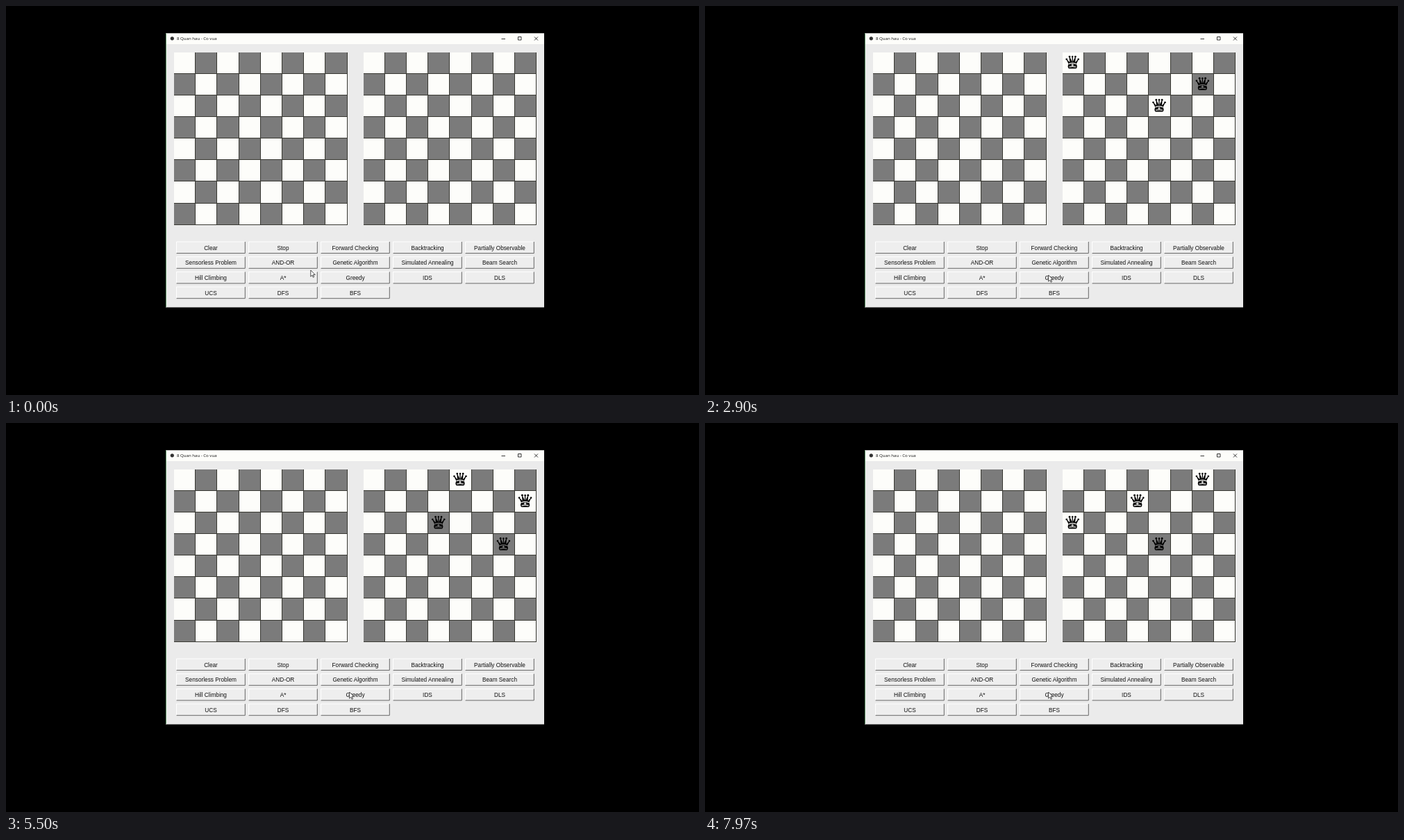
An HTML page that plays this animation: 998 by 561 pixels, repeating every 8000 ms.

```html
<!DOCTYPE html>
<html lang="vi">
<head>
<meta charset="utf-8">
<title>8 Quan hau</title>
<style>
  html, body { margin: 0; width: 100%; height: 100%; overflow: hidden; background: #000; }
  svg { display: block; width: 998px; height: 561px; }
  .label { font: 8.25px "Liberation Sans", Arial, sans-serif; text-anchor: middle; fill: #111; }
  .title { font: 6.1px "Open Sans", "Noto Sans", sans-serif; fill: #111; }
</style>
</head>
<body>
<svg id="stage" viewBox="0 0 998 561">
  <defs>
    <g id="queen">
      <path d="M-5.6 2.6 L-8.7 -3.8 L-8 -4.2 L-4 .2 L-4.6 -7 L-3.6 -7 L-.2 .2 L.2 .2 L3.6 -7 L4.6 -7 L4 .2 L8 -4.2 L8.7 -3.8 L5.6 2.6 L6.6 5.4 Q6.6 9 4.6 9.2 H-4.6 Q-6.6 9 -6.6 5.4Z"/>
      <path d="M0 1 V-7.5" stroke="#000" stroke-width="1.3"/>
      <circle cx="-8.5" cy="-4.3" r="1.3"/>
      <circle cx="-4.2" cy="-7.9" r="1.4"/>
      <circle cx="0" cy="-8" r="1.2"/>
      <circle cx="4.2" cy="-7.9" r="1.4"/>
      <circle cx="8.5" cy="-4.3" r="1.3"/>
      <path fill="none" stroke="currentColor" stroke-width="1.2"
        d="M-5.4 2.6 Q0 .2 5.4 2.6 M-5 7 Q0 5.6 5 7 M-1.8 4.2 H1.8 M0 2.6 V5.4"/>
    </g>
  </defs>
  <rect x="230" y="39.5" width="545" height="395.5" fill="#ebebeb"/>
  <rect x="230" y="39.5" width="545" height="15.5" fill="#fdfdfa"/>
  <rect x="230" y="39.5" width="1" height="395.5" fill="#679a70"/>
  <rect x="230" y="434" width="545" height="1" fill="#8c8c8c"/>
  <circle cx="239.3" cy="46.8" r="2.6" fill="#333"/>
  <text class="title" x="246" y="49">8 Quan hau - Co vua</text>
  <path d="M713.5 47.5 h5.5 M737.5 44.5 h4.5 v4.5 h-4.5z M761 44.5 l5 5 m0 -5 l-5 5"
    fill="none" stroke="#222" stroke-width=".9"/>
  <g id="boards" shape-rendering="crispEdges"></g>
  <g id="buttons"></g>
  <g id="queens"></g>
  <path id="cursor" d="M0 0 V9.2 L2.1 7.2 L3.5 10.3 L4.9 9.7 L3.5 6.6 H6.4Z"
    fill="#fff" stroke="#222" stroke-width=".8"/>
</svg>
<script>
const CELL_W = 31.2, CELL_H = 31.14, TOP = 66.06, LEFT_BOARD = 241.4, RIGHT_BOARD = 514;
const WHITE = '#fdfdfa', GREY = '#7b7b7b';
const DURATION = 8000, FRAME = 100 / 3;
const byId = id => document.getElementById(id);

function add(parent, tag, attrs, text) {
  const node = document.createElementNS('http://www.w3.org/2000/svg', tag);
  for (const name in attrs) node.setAttribute(name, attrs[name]);
  if (text) node.textContent = text;
  return parent.appendChild(node);
}

const cellColor = (row, col) => (row + col) % 2 ? GREY : WHITE;

function drawBoard(left) {
  const lineX = k => Math.floor(left + k * CELL_W);
  const lineY = k => Math.floor(TOP + k * CELL_H);
  const x0 = lineX(0) + 1, y0 = lineY(0) + 1;
  let lines = '';
  for (let row = 0; row < 8; row++) {
    for (let col = 0; col < 8; col++) {
      add(byId('boards'), 'rect', {
        x: lineX(col) + 1, y: lineY(row) + 1,
        width: lineX(col + 1) - lineX(col), height: lineY(row + 1) - lineY(row),
        fill: cellColor(row, col)
      });
    }
    lines += `M${lineX(row + 1) + .5} ${y0} V${lineY(8) + 1} M${x0} ${lineY(row + 1) + .5} H${lineX(8) + 1} `;
  }
  add(byId('boards'), 'path', { d: lines, stroke: '#383832' });
}

function drawButton(name, index) {
  const x = 245.5 + index % 5 * 104, y = 340 + Math.floor(index / 5) * 21.7;
  const group = byId('buttons');
  add(group, 'rect', { x, y, width: 99, height: 17, fill: '#eeeeee' });
  add(group, 'path', { d: `M${x} ${y + 17} V${y} h99`, fill: 'none', stroke: '#fff' });
  add(group, 'path', { d: `M${x} ${y + 16.6} h98.8 V${y}`, fill: 'none', stroke: '#666' });
  add(group, 'text', { class: 'label', x: x + 49.5, y: y + 11.6 }, name);
}

drawBoard(LEFT_BOARD);
drawBoard(RIGHT_BOARD);
['Clear', 'Stop', 'Forward Checking', 'Backtracking', 'Partially Observable',
 'Sensorless Problem', 'AND-OR', 'Genetic Algorithm', 'Simulated Annealing', 'Beam Search',
 'Hill Climbing', 'A*', 'Greedy', 'IDS', 'DLS', 'UCS', 'DFS', 'BFS'].forEach(drawButton);

// A state is a string of queen columns, one digit per row.
const columns = state => [...state].map(Number);

function attackedCells(state) {
  const queens = columns(state);
  let count = 0;
  for (let row = 0; row < 8; row++)
    for (let col = 0; col < 8; col++)
      if (queens.some((q, i) => i === row || q === col || Math.abs(row - i) === Math.abs(col - q))) count++;
  return count;
}

function children(state) {
  const queens = columns(state), row = queens.length;
  return [0, 1, 2, 3, 4, 5, 6, 7]
    .filter(col => row < 8 && queens.every((q, i) => q !== col && Math.abs(col - q) !== row - i))
    .map(col => state + col);
}

// Best-first search: fewest attacked cells, ties in lexicographic order.
function greedyOrder(last) {
  const frontier = [{ state: '', cost: 0 }], visited = [];
  const before = (a, b) => a.cost < b.cost || a.cost === b.cost && a.state < b.state;
  while (frontier.length) {
    let best = 0;
    frontier.forEach((node, i) => { if (before(node, frontier[best])) best = i; });
    const { state } = frontier.splice(best, 1)[0];
    visited.push(state);
    if (state === last) break;
    for (const child of children(state)) frontier.push({ state: child, cost: attackedCells(child) });
  }
  return visited;
}

// Pace of the search: the tick at which each milestone is on the board.
const milestones = [[15, ''], [52, '530'], [87, '064'], [133, '4205'], [165, '4736'], [187, '0572'], [239, '6304']];
const order = greedyOrder('6304');
const pace = milestones.map(([tick, state]) => [tick, order.indexOf(state)]);

function stateAt(tick) {
  if (tick <= pace[0][0]) return '';
  const next = pace.findIndex(([end]) => tick <= end);
  const [t0, i0] = pace[next - 1], [t1, i1] = pace[next];
  return order[Math.floor(i0 + (i1 - i0) * (tick - t0) / (t1 - t0) + 1e-6)];
}

const queenNodes = Array.from({ length: 8 }, () => add(byId('queens'), 'use', { href: '#queen' }));

function render(now) {
  const time = now % DURATION;
  const tick = Math.floor((time + 3.4) / FRAME);
  const state = stateAt(tick);
  queenNodes.forEach((node, row) => {
    const col = Number(state[row]);
    node.style.display = row < state.length ? '' : 'none';
    if (row >= state.length) return;
    node.setAttribute('transform', `translate(${529.2 + col * CELL_W} ${81 + row * CELL_H})`);
    node.setAttribute('color', cellColor(row, col));
  });
  const p = Math.min(1, tick / 12), ease = p * p * (3 - 2 * p);
  byId('cursor').setAttribute('transform', `translate(${438.8 + 55.8 * ease} ${381 + 7 * ease})`);
}

function loop() {
  render(performance.now());
  requestAnimationFrame(loop);
}
loop();
</script>
</body>
</html>
```
